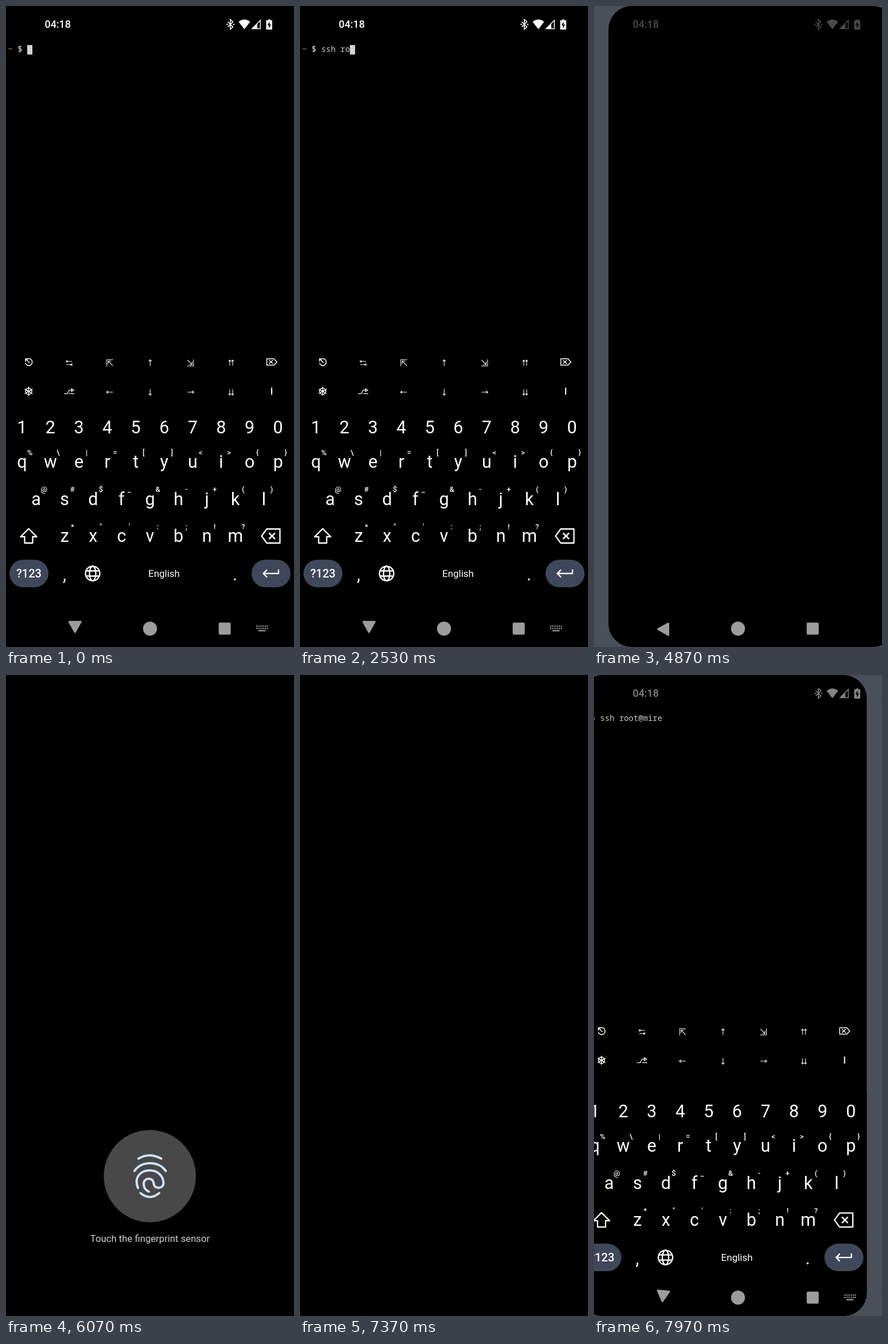
Animation, 502 px wide and 1116 px high, one loop 8000 ms. Source, as an HTML page:

```html
<!DOCTYPE html>
<html lang="en">
<head>
<meta charset="utf-8">
<title>Terminal unlock</title>
<style>
html, body { margin: 0; width: 100%; height: 100%; overflow: hidden; background: #000; }
svg { display: block; width: 100%; height: 100%; }
text { font-family: Roboto, sans-serif; fill: #fff; white-space: pre; }
.mono { font: 13.9px "Noto Sans Mono", "DejaVu Sans Mono", monospace; fill: #c9c9c4; }
.key { font-size: 30.5px; text-anchor: middle; }
.hint { font-size: 13px; font-weight: 500; text-anchor: middle; }
.mid { text-anchor: middle; }
.line { fill: none; stroke: #fff; }
.round { stroke-linecap: round; stroke-linejoin: round; }
</style>
</head>
<body>
<svg viewBox="0 0 502 1116" preserveAspectRatio="none">
  <defs>
    <clipPath id="card"><rect width="502" height="1116" rx="41"/></clipPath>
  </defs>
  <rect id="backdrop" width="502" height="1116"/>

  <g id="terminal"><g clip-path="url(#card)">
    <rect width="502" height="1116"/>
    <text class="mono" x="3.4" y="80" style="fill:#9c9c5c">~</text>
    <text class="mono" x="20.2" y="80" style="fill:#f4f4f4">$</text>
    <text class="mono" id="command" x="37" y="80"></text>
    <rect id="cursor" width="9" height="16.5" fill="#d4d4d4"/>
    <g id="extra" class="line" stroke-width="1.05"></g>
    <g id="keyboard">
      <rect y="700" width="502" height="416"/>
      <g id="keys"></g>
      <g fill="#3f475a">
        <rect x="6" y="964" width="68" height="48" rx="24"/>
        <rect x="428" y="964" width="68" height="48" rx="24"/>
      </g>
      <text class="mid" x="40" y="995" font-size="20" font-weight="500">?123</text>
      <text class="key" x="102" y="1000">,</text>
      <text class="mid" x="275.5" y="994" font-size="17">English</text>
      <text class="key" x="399" y="1000">.</text>
      <g class="line" stroke-width="2.3" stroke-linejoin="round">
        <path d="M39.5 910L53.5 924H46.5V935H32.5V924H25.5Z"/>
        <path d="M454.5 910.5H477.500V935H454.500L445.500 922.800Z"/>
        <path d="M458.500 917.500L469 928M469 917.500L458.500 928" stroke-width="2.6"/>
        <circle cx="151" cy="988" r="12.5"/>
        <ellipse cx="151" cy="988" rx="5.5" ry="12.5"/>
        <path d="M140 983.5H162M140 992.5H162"/>
        <path d="M475 981V988H449M455 981.5L448.5 988L455 994.5"/>
      </g>
    </g>
  </g></g>

  <g id="lock"><rect width="502" height="1116" clip-path="url(#card)"/></g>

  <g id="prompt">
    <circle id="disc" cx="250.7" cy="872.5" r="80.3"/>
    <g id="print" class="line round" style="stroke:#d0e0fc" stroke-width="4">
      <path d="M231 842Q250.5 830.5 270.5 842"/>
      <path d="M224 863.5C236 845.5 266 845.5 278.5 863.5"/>
      <path d="M230 893C222.5 874 235 862.5 250.5 862.5C266 862.5 274.5 874 274.5 884.5C274.5 895 258.5 895.5 257.5 885.5C256.5 873.5 240 874.5 240 886C240 892.5 243.5 897 249 899.5"/>
      <path d="M234.5 902Q250.5 915.5 267 902"/>
    </g>
    <text id="label" class="mid" x="251" y="986.5" font-size="16.7" style="fill:#cfcfcf">Touch the fingerprint sensor</text>
    <g id="success" fill="none">
      <circle cx="250.7" cy="872.5" r="78" stroke="#101614" stroke-width="4"/>
      <circle cx="250.7" cy="872.5" r="75.3" stroke="#78917f" stroke-width="2.4"/>
      <path id="check" d="M206 867L232 890.5L292 837" stroke="#b0d8c3" stroke-width="8"/>
    </g>
  </g>

  <g id="status" fill="#fff">
    <text x="67.5" y="38" font-size="17.9" font-weight="500">04:18</text>
    <path class="line" stroke-width="1.6" d="M386.5 27.5L395.5 36.5L391 40.5V23.5L395.5 27.5L386.5 36.5"/>
    <circle cx="385.5" cy="32" r="1.2"/><circle cx="397" cy="32" r="1.2"/>
    <path d="M405.5 27.5Q415.5 19.5 425.5 27.5L415.5 40.5Z"/>
    <path class="line" stroke-width="1.4" d="M443.3 25V39.5H429Z"/>
    <path d="M438 30V40H428Z"/>
    <path d="M456.5 23.5H461V25H464V41H453.5V25H456.5Z"/>
    <path fill="#000" d="M459.5 27L455.5 33.5H458.2V39L462.2 32.3H459.5Z"/>
  </g>

  <g id="nav" fill="#fff" fill-opacity=".61">
    <path id="back" d="M110 1070.5H131Q132.5 1071 131.5 1073L121.5 1091Q120.3 1092.5 119 1091L109 1073Q108.5 1071 110 1070.5Z"/>
    <circle cx="251" cy="1084" r="12.2"/>
    <rect x="370.7" y="1073.5" width="21" height="21" rx="2.5"/>
    <g id="switcher"></g>
  </g>
</svg>
<script>
const LOOP = 8000, CELL = 8.34, TRAVEL = 528, PITCH = 49.6;
const COMMAND = 'ssh root@mire';
const TYPED = [1530, 1700, 1860, 2000, 2230, 2530, 2700, 2830, 2960, 3080, 3200, 3330, 3500];
const ENTER = 3800, OPEN = 4605, SHOW = 5120, MATCH = 6630, AWAY = 7025, CLOSE = 7709.6;

const $ = id => document.getElementById(id);
const clamp = x => Math.min(1, Math.max(0, x));
const span = (t, start, length) => clamp((t - start) / length);
const bezier = (a, b, c, d, s) => {
  const r = 1 - s;
  return r * r * r * a + 3 * r * r * s * b + 3 * r * s * s * c + s * s * s * d;
};

// Two-part "emphasized" curve: quick start, very long settle.
function emphasized(x) {
  if (x <= 0 || x >= 1) return clamp(x);
  const [xs, ys] = x < .166
    ? [[0, .05, .133, .166], [0, 0, .06, .4]]
    : [[.166, .208, .25, 1], [.4, .82, 1, 1]];
  let lo = 0, hi = 1;
  for (let i = 0; i < 24; i++) {
    const m = (lo + hi) / 2;
    if (bezier(...xs, m) < x) lo = m; else hi = m;
  }
  return bezier(...ys, lo);
}

function add(parent, tag, attrs, text) {
  const el = document.createElementNS('http://www.w3.org/2000/svg', tag);
  for (const name in attrs) el.setAttribute(name, attrs[name]);
  if (text) el.textContent = text;
  parent.append(el);
  return el;
}

// Rows start a number of key pitches in from the left.
function keyRow(chars, indent, y, hints = '') {
  const x = 27.8 + PITCH * indent;
  [...chars].forEach((c, i) => add($('keys'), 'text', { class: 'key', x: x + PITCH * i, y }, c));
  [...hints].forEach((c, i) => add($('keys'), 'text', { class: 'hint', x: x + 13.6 + PITCH * i, y: y - 22.5 }, c));
}
keyRow('1234567890', 0, 744);
keyRow('qwertyuiop', 0, 804, '%\\|=[]<>{}');
keyRow('asdfghjkl', .5, 868.5, '@#$_&-+()');
keyRow('zxcvbnm', 1.5, 933, '*"\':;!?');

// Each extra key: path around its centre, turn, and a weight for the bolder symbols.
const up = 'M0 5.5V-5M-2.5 -2.5L0 -5.5L2.5 -2.5';
const corner = 'M-5 6V-5.5H6M5.5 5L-2.5 -3M-2.5 2V-3H2.5';
const pair = 'M-2.5 5V-5M-4.5 -2.5L-2.5 -5L-.5 -2.5M2.5 5V-5M.5 -2.5L2.5 -5L4.5 -2.5';
const icons = [
  ['M-3.5 -4.5A6 6 0 1 1 -5.5 2M1.5 1.5L-5.5 -5.5M-5.5 -.5V-5.5H-.5', 0, 1.5],
  ['M-5 -4.5V-.5M5 -2.5H-4M-2.5 -4L-4 -2.5L-2.5 -1M5 1V5M-5 3H4M2.5 1.5L4 3L2.5 4.5', 0],
  [corner, 0], [up, 0], [corner, 180], [pair, 0],
  ['M-8.5 -5.5H4L9 0L4 5.5H-8.5ZM-4.5 -3L2 3M2 -3L-4.5 3', 0, 1.5],
  ['M5.5 0A5.5 5.5 0 1 1 -5.5 0A5.5 5.5 0 1 1 5.5 0M0 -8V8M-7 -4L7 4M-7 4L7 -4', 0, 1.4],
  ['M-9 4H-3L0 -2H4M4 -4.5L8 -2L4 .5ZM0 4H9', 0, 1.3],
  [up, -90], [up, 180], [up, 90], [pair, 180],
  ['M0 -6.5V6', 0, 2]
];
icons.forEach(([d, turn, weight], i) => {
  const x = 39.5 + 70.6 * (i % 7);
  const y = (i < 7 ? 621.3 : 672.3) - (weight ? 1.5 : 0);
  const el = add($('extra'), 'path', { d, transform: `translate(${x} ${y}) rotate(${turn})` });
  if (weight) el.setAttribute('stroke-width', weight);
});

for (let i = 0; i < 12; i++) {
  add($('switcher'), 'rect', { x: 436 + 3.7 * (i % 6), y: i < 6 ? 1078.5 : 1082.5, width: 2.2, height: 2.2 });
}
add($('switcher'), 'rect', { x: 440, y: 1086.5, width: 12.5, height: 2.2 });

const move = (id, x, y) => $(id).setAttribute('transform', `translate(${x} ${y})`);
const fade = (id, a) => $(id).setAttribute('opacity', a);
const show = (id, on) => { $(id).style.display = on ? '' : 'none'; };
const corners = document.querySelector('#card rect');

function render(t) {
  const closing = t >= CLOSE;
  const away = closing
    ? 1 - emphasized(span(t, CLOSE, 525))
    : emphasized(span(t, OPEN, 525));
  const moving = away > 0 && away < 1;
  $('backdrop').setAttribute('fill', moving ? '#4a5058' : '#000');
  corners.setAttribute('rx', moving ? 41 : 0);
  move('terminal', -TRAVEL * away, 0);
  move('lock', TRAVEL * (1 - away), 0);
  show('terminal', away < 1);
  show('lock', away > 0);

  const count = TYPED.filter(at => t >= at).length;
  $('command').textContent = COMMAND.slice(0, count);
  const entered = t >= ENTER;
  $('cursor').setAttribute('x', entered ? 3.5 : 37 + CELL * count);
  $('cursor').setAttribute('y', entered ? 85 : 68);

  const hidden = closing ? (1 - span(t, 7835, 275)) ** 4 : span(t, OPEN + 20, 260) ** 2;
  move('keyboard', 0, 400 * hidden);

  fade('status', closing ? span(t, 7765, 400) : 1 - span(t, OPEN + 30, 330));
  fade('nav', closing ? 1 : 1 - span(t, SHOW - 30, 150));
  const turn = 90 * (closing ? (1 - span(t, 7794, 237)) ** 2 : span(t, OPEN + 20, 240) ** 2);
  $('back').setAttribute('transform',
    `translate(${turn * .04} ${turn * .075}) rotate(${turn} 120 1078)`);
  show('switcher', turn < 45);

  const shown = 1 - (1 - span(t, SHOW, 250)) ** 3;
  const gone = span(t, AWAY, 350);
  const leave = 1 - (1 - gone) ** 2;
  move('prompt', 0, 427 * (1 - shown + leave));
  fade('prompt', shown * (1 - gone));

  const matched = span(t, MATCH, 200);
  const shade = Math.round(72 - 57 * matched);
  $('disc').setAttribute('fill', `rgb(${shade},${shade},${shade + 1})`);
  fade('print', 1 - matched);
  fade('label', 1 - span(t, MATCH, 100));
  fade('success', matched);
  // Short stroke first, long stroke second, equal time each.
  const drawn = span(t, 6800, 200);
  const stroke = 35 * clamp(drawn * 2) + 80.5 * clamp(drawn * 2 - 1);
  $('check').setAttribute('stroke-dasharray', `${stroke} 200`);
  show('check', drawn > 0);
}

const begin = performance.now();
function tick() {
  render((performance.now() - begin) % LOOP);
  requestAnimationFrame(tick);
}
tick();
</script>
</body>
</html>
```
